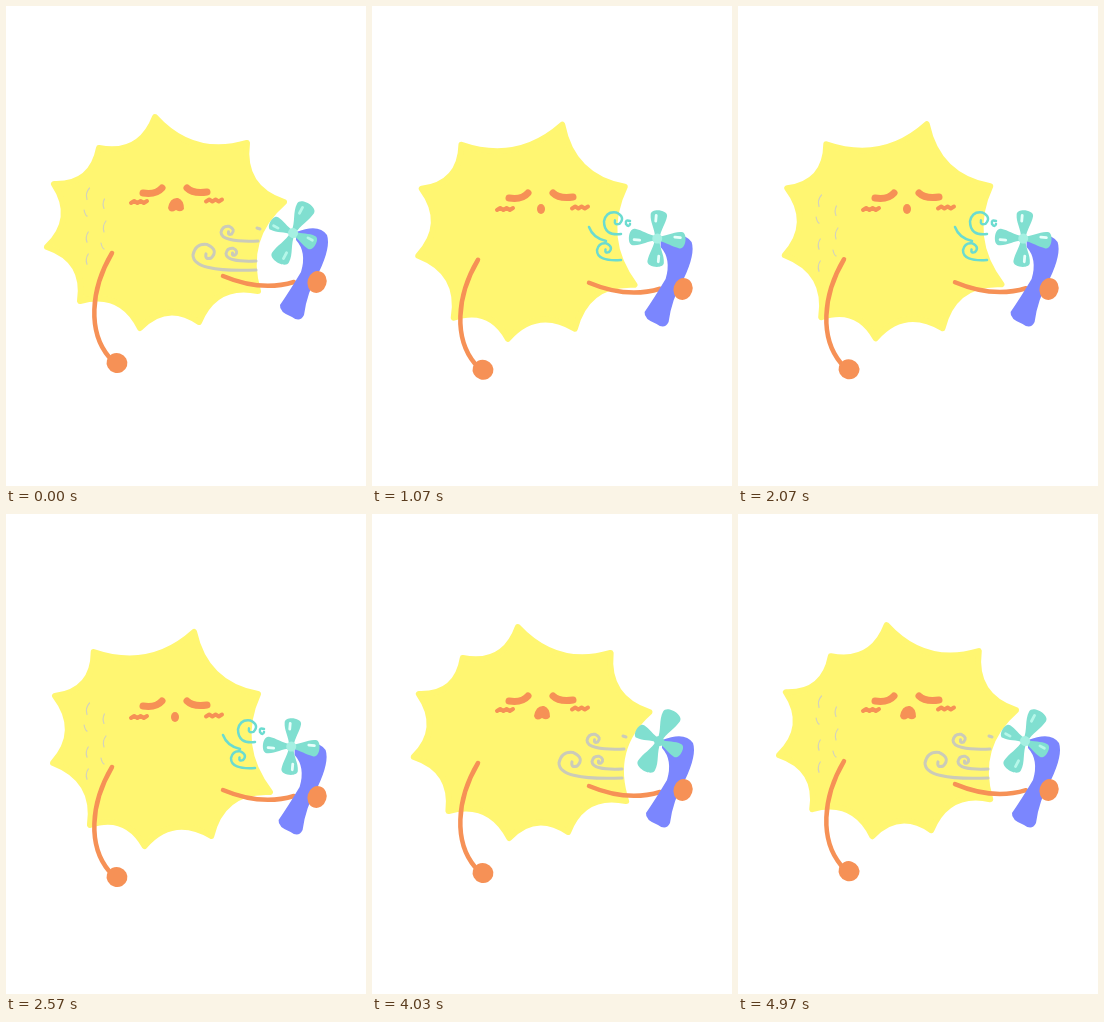
Animation, 360 px wide and 480 px high, one loop 5000 ms. Source, as an HTML page with a canvas:

```html
<!DOCTYPE html>
<html lang="en">
<head>
<meta charset="utf-8">
<title>Sun with a hand fan</title>
<style>
html, body { margin: 0; width: 100%; height: 100%; overflow: hidden; background: #fff; }
canvas { display: block; width: 360px; height: 480px; }
</style>
</head>
<body>
<canvas id="stage" width="360" height="480"></canvas>
<script>
const ctx = document.getElementById('stage').getContext('2d');
const LOOP = 5000, ROUND = 500;
const YELLOW = '#fff671', ORANGE = '#f69156', PURPLE = '#7b86fe', TEAL = '#80dfd0';

// tips: points of the rim; drop: how far arms, fan and cheeks sink; curls: x, y, reach, height.
const SIGH = {
  tips: [[191,119], [253,181], [262,279], [202,323], [135,333], [81,312], [46,250], [50,183], [90,139]],
  drop: 7, brow: 5, sway: -1, spin: 5, bulge: 0,
  mouth: 'M165 203 a4 5 0 1 0 8 0 a4 5 0 1 0 -8 0',
  curls: [[249, 228, 17, 22], [249, 254, 24, 17]],
  gust: 'M217 221 Q221 232 234 235M258 215 q-5 -2 -4 3 q3 4 4 0',
  windColor: '#6bdcd0', windWidth: 2.5, shine: '#e8fffb'
};
const PANT = {
  tips: [[145,114], [209,127], [277,190], [248,276], [193,324], [137,321], [79,303], [45,246], [55,179], [96,128]],
  drop: 6, brow: 2, sway: 0, spin: 53, bulge: 0,
  mouth: 'M161.5 207 a8.5 9 0 1 0 17 0 a8.5 9 0 1 0 -17 0',
  curls: [[247, 236, 20, 24], [245, 261, 35, 19]],
  gust: 'M257 258 l4 -2',
  windColor: '#a9fcea', windWidth: 2.5, shine: '#b5f7e9'
};
const GASP = {
  tips: [[149,111], [241,137], [278,196], [252,285], [193,316], [134,322], [74,295], [41,241], [48,178], [93,142]],
  drop: 0, brow: 0, sway: 2, spin: 28, bulge: 5,
  mouth: 'M162 202 Q164 191 172 192 Q178 194 178 203 Q175 207 170 204 Q164 208 162 202Z',
  curls: [[250, 264, 63, 26], [250, 255, 30, 13], [252, 235, 37, 15]],
  gust: 'M251 222 l3 1',
  windColor: '#cbcbb9', windWidth: 3, shine: '#b5f7e9'
};
const ORDER = [SIGH, PANT, GASP];

const BROWS = 'M137 187 Q150 189 156 182M181 182 Q187 188 201 186';
const ARM = 'M106 247 C84 284 82 326 103 351';
const REACH = 'M217 270 Q255 286 288 276';
const HANDLE = 'M290 226 Q313 217 321 229 Q325 241 313 266 Q301 286 298 309 Q294 317 286 311 ' +
  'Q273 306 274 299 Q283 286 295 266 Q301 246 290 234Z';

// The rim leans slowly, then springs back before the loop ends.
const leanAt = t => Math.max(0, Math.min(1, (t - 570) / 2000, (LOOP - t) / 300));

// Each round shows two short drawings and holds the third; the last round is hastier.
function stepAt(t) {
  const s = (t + LOOP - 50) % LOOP;
  const round = Math.floor(s / ROUND);
  const beat = round === 9 ? 115 : 165;
  return { round, pose: ORDER[Math.min(2, Math.floor(s % ROUND / beat))] };
}

function stroke(d, color, width) {
  ctx.strokeStyle = color;
  ctx.lineWidth = width;
  ctx.stroke(new Path2D(d));
}

function fill(d, color) {
  ctx.fillStyle = color;
  ctx.fill(new Path2D(d));
}

function ellipse(x, y, rx, ry, color) {
  ctx.fillStyle = color;
  ctx.beginPath();
  ctx.ellipse(x, y, rx, ry, .3, 0, Math.PI * 2);
  ctx.fill();
}

function shifted(x, y, paint) {
  ctx.save();
  ctx.translate(x, y);
  paint();
  ctx.restore();
}

// Tips run clockwise, so each hollow bends to the right of its chord.
function drawRim(tips) {
  ctx.beginPath();
  ctx.moveTo(...tips[0]);
  tips.forEach(([x, y], i) => {
    const [nx, ny] = tips[(i + 1) % tips.length];
    const chord = Math.hypot(nx - x, ny - y);
    const bend = 2 * (Math.min(.17 * chord, 12.5) + 2.5) / chord;
    ctx.quadraticCurveTo((x + nx) / 2 - (ny - y) * bend, (y + ny) / 2 + (nx - x) * bend, nx, ny);
  });
  ctx.closePath();
  ctx.fillStyle = ctx.strokeStyle = YELLOW;
  ctx.lineWidth = 6;
  ctx.fill();
  ctx.stroke();
}

function drawCheek(x, y) {
  let d = `M${x} ${y + 1}`;
  for (let i = 1; i <= 5; i++) d += `L${x + i * 3.2} ${y + (i % 2 ? -1 : 1)}`;
  stroke(d, ORANGE, 4);
}

function drawSweat(drop) {
  for (let i = 0; i < 7; i++) {
    const x = 81 + 17 * (i % 2), y = 182 + drop + 11 * i;
    const bow = 3 * Math.sin(i * 2 + 1);
    stroke(`M${x + bow} ${y} q${-bow - 2} 5 ${-bow} ${9 + bow}`, '#d3d2bd', 1.2);
  }
}

function curl([x, y, reach, h]) {
  const at = (u, v) => `${x - reach + u * h} ${y + v * h} `;
  return `M${x} ${y}Q${at(0, .1)}${at(0, -.58)}Q${at(.1, -1.04)}${at(.55, -.98)}` +
    `Q${at(1, -.77)}${at(.7, -.46)}Q${at(.45, -.38)}${at(.5, -.62)}`;
}

function drawBlade(length, shine) {
  const half = length * .31;
  ctx.beginPath();
  ctx.moveTo(0, -2);
  ctx.bezierCurveTo(length * .35, -3, length * .55, -half, length * .85, -half);
  ctx.bezierCurveTo(length * 1.08, -half, length * 1.06, half, length * .82, half * .9);
  ctx.bezierCurveTo(length * .55, half * .8, length * .35, 3, 0, 2);
  ctx.fillStyle = TEAL;
  ctx.fill();
  if (shine) stroke(`M${length * .62} ${-half * .35}h${length * .2}`, shine, 2.8);
}

function drawFan({ spin, bulge }, shine) {
  for (let i = 0; i < 4; i++) {
    ctx.save();
    ctx.rotate((spin + 90 * i) * Math.PI / 180);
    drawBlade(28 + (i % 2 ? bulge : -bulge * .6), shine);
    ctx.restore();
  }
  ellipse(0, 0, 5, 5, shine ? '#a5f0e2' : TEAL);
}

function draw(t) {
  const { round, pose } = stepAt(t);
  const { drop } = pose;
  const lean = leanAt(t), lift = pose.sway * lean;

  ctx.fillStyle = '#fff';
  ctx.fillRect(0, 0, 360, 480);
  ctx.lineCap = ctx.lineJoin = 'round';

  ctx.save();
  ctx.transform(1, 0, lean / 33, 1, -215 * lean / 33, lift);
  drawRim(pose.tips);
  ctx.restore();

  if (round % 6 > 2 && pose !== PANT) drawSweat(drop);
  shifted(0, pose.brow, () => stroke(BROWS, ORANGE, 7));
  drawCheek(125, 196 + drop);
  drawCheek(200, 194.5 + drop);
  fill(pose.mouth, ORANGE);
  stroke(pose.curls.map(curl).join('') + pose.gust, pose.windColor, pose.windWidth);

  shifted(0, drop + lift, () => {
    stroke(ARM, ORANGE, 4.5);
    ellipse(111, 357, 10.5, 10, ORANGE);
    stroke(REACH, ORANGE, 4.5);
  });
  shifted(-drop / 5, drop, () => fill(HANDLE, PURPLE));
  shifted(287 - drop / 4, 227 + drop * .8, () => drawFan(pose, round !== 7 && pose.shine));
  ellipse(311, 276 + drop, 9.5, 11, ORANGE);
}

function tick() {
  draw(performance.now() % LOOP);
  requestAnimationFrame(tick);
}
tick();
</script>
</body>
</html>
```
